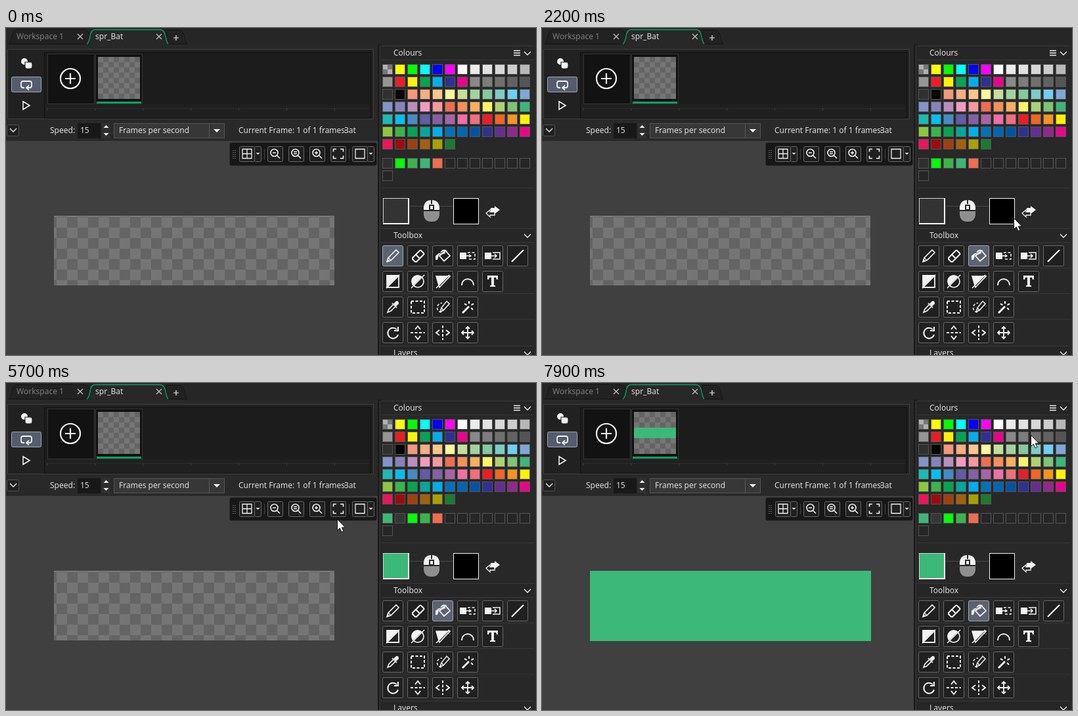
Recreate the animation shown at these times as an HTML page with a canvas. Size 807 by 498 pixels, loop 8000 ms.

```html
<!DOCTYPE html>
<html lang="en">
<head>
<meta charset="utf-8">
<title>Sprite editor</title>
<style>
html, body { margin: 0; width: 100%; height: 100%; overflow: hidden; background: #282828; }
canvas { display: block; }
</style>
</head>
<body>
<canvas id="stage" width="807" height="498"></canvas>
<script>
const ctx = document.getElementById('stage').getContext('2d');
const LOOP = 8000, STEP = 100;
const WHITE = '#f2f2f2', GREEN = '#3cb878', ACCENT = '#08a262', PANEL = '#282828';

// Moments of the clicks
const PICK_TOOL = 1600, PICK_COLOUR = 5100, FILL = 6400;

// Pointer path: time, x, y
const PATH = [
  [100, 476, 488], [500, 556, 432], [900, 632, 381], [1100, 650, 362], [1400, 669, 342],
  [1600, 671, 344], [1800, 747, 348], [2000, 748, 349], [2400, 690, 230], [2700, 662, 151],
  [3000, 733, 132], [3300, 690, 121], [3600, 664, 114], [3800, 654, 120], [4100, 700, 134],
  [4500, 766, 128], [4800, 773, 121], [5000, 793, 119], [5200, 793, 119], [5400, 766, 127],
  [5500, 690, 152], [5700, 505, 208], [6000, 352, 306], [6200, 323, 336], [6500, 323, 336],
  [6800, 430, 290], [7200, 606, 214], [7500, 692, 130], [7700, 740, 88], [7900, 745, 80]
];

const PALETTE = [
  'check ff0 0f0 0ff 00f f0f fff ebebeb e1e1e1 d7d7d7 cccccc b7b7b7',
  '959595 ed1c24 fff200 00a651 00aeef 2e3192 ec008c 898989 7d7d7d 707070 626262 555555',
  '303030 000 f7977a f9ad81 fdc68a fff79a c4df9b a2d39c 82ca9d 7bcdc8 6ecff6 7ea7d8',
  '8493ca 8882be bc8dbf f49ac2 f6989d f26c4f f68e55 fbaf5c fff467 acd372 7cc576 3bb878',
  '1abbb4 00bff3 438cca 605ca8 855fa8 a763a8 f06ea9 f26d7d ed1c24 f26522 f7941d fff200',
  '8dc73f 39b54a 00a651 00a99d 00aeef 0072bc 0066b3 0054a6 2e3192 662d91 92278f ec008c',
  'ed145b 9e0b0f a0410d a36209 aba000 1a7b30'
].map(row => row.split(' '));

// Tool icons around their centre: [outline, filled part, line width, dashed outline]
const TOOLS = [
  [
    ['M-9 9L-7 3L5 -9L9 -5L-3 7ZM-7 3L-3 7', 'M-9 9L-8 5L-5 8Z'],
    ['M-8 3L3 -8Q4 -9 5 -8L9 -4Q10 -3 9 -2L-2 9H-4L-8 5ZM-3 -2L3 4', '', 2],
    ['M-5 0L4 -8L11 0L2 8ZM-3 -5Q1 -11 6 -7M-3 -2L4 -5M-3 -3Q-8 -4 -9 3', 'M-11 0L-7 -3L-6 -1L-8 6H-11Z', 1.8],
    ['M-2 0H5M2 -2L5 0L2 2', 'M-12 -5H-2V5H-12Z', 1.5, 'M0 -5H11V5H0'],
    ['M-2 0H6M3 -3L6 0L3 3M0 -5H11V5H0', 'M-12 -5H-2V5H-12Z'],
    ['M-9 9L9 -9', '', 2.2]
  ], [
    ['M-9 -9H9V9H-9ZM-10 10L10 -10', 'M-9 8V-9H8Z', 1.8],
    ['M9 0A9 9 0 1 1 -9 0A9 9 0 1 1 9 0M-10 10L10 -10', 'M-7 6A9 9 0 0 1 6 -7Z'],
    ['M-10 -8H11L-5 9ZM-10 10L10 -10', 'M-10 -8H7L-6 6Z'],
    ['M-9 6C-9 -7 9 -7 9 6', '', 1.8],
    ['', 'M-8 -9H8V-3H6L5 -6H2V6H4V8H-4V6H-2V-6H-5L-6 -3H-8Z']
  ], [
    ['M-8 8L-6 3L1 -4L4 -1L-3 6ZM-1 -6L6 1', 'M1 -5L5 -9Q9 -10 9 -5L5 -1Z'],
    ['', '', 2, 'M-10 -9H10V9H-10Z'],
    ['M-4 7L-2 1L6 -9L10 -5L1 5ZM-2 1L1 5', '', 1.5, 'M-2 8A7 7 0 1 1 -1 -6'],
    ['M-8 9L2 -1', '', 3, 'M-5 -5L-1 -3M2 -9V-5M9 -5L5 -3M8 4L5 1']
  ], [
    ['M6 -5A8 8 0 1 0 8 3M8 -9V-3H2', '', 2],
    ['M-4 -5L0 -10L4 -5M-4 5L0 10L4 5', '', 2, 'M-11 0H11'],
    ['M-5 -4L-10 0L-5 4M5 -4L10 0L5 4', '', 2, 'M0 -11V11'],
    ['M0 -9V9M-9 0H9M-3 -6L0 -9L3 -6M-3 6L0 9L3 6M-6 -3L-9 0L-6 3M6 -3L9 0L6 3', '', 1.8]
  ]
];

function box(x, y, w, h, fill, stroke) {
  if (fill) { ctx.fillStyle = fill; ctx.fillRect(x, y, w, h); }
  if (stroke) {
    ctx.strokeStyle = stroke;
    ctx.lineWidth = 1;
    ctx.strokeRect(x + .5, y + .5, w - 1, h - 1);
  }
}

function round(x, y, w, h, r, fill, stroke) {
  ctx.beginPath();
  ctx.roundRect(x + .5, y + .5, w - 1, h - 1, r);
  ctx.fillStyle = fill;
  ctx.fill();
  if (stroke) { ctx.strokeStyle = stroke; ctx.lineWidth = 1; ctx.stroke(); }
}

function shape(x, y, d, { stroke, fill, width = 1.5, dash = [] }) {
  const path = new Path2D(d);
  ctx.save();
  ctx.translate(x, y);
  if (fill) { ctx.fillStyle = fill; ctx.fill(path); }
  if (stroke) {
    ctx.strokeStyle = stroke;
    ctx.lineWidth = width;
    ctx.setLineDash(dash);
    ctx.stroke(path);
  }
  ctx.restore();
}

const line = (x, y, d, width) => shape(x, y, d, { stroke: WHITE, width });
const solid = (x, y, d, fill = WHITE) => shape(x, y, d, { fill });

function text(s, x, y, fill = '#dedede') {
  ctx.font = '12px "Noto Sans", "Open Sans", sans-serif';
  ctx.fillStyle = fill;
  ctx.fillText(s, x, y);
}

function checker(x, y, w, h, size, ox, oy) {
  ctx.save();
  ctx.beginPath();
  ctx.rect(x, y, w, h);
  ctx.clip();
  box(x, y, w, h, '#757575');
  for (let j = -1; j * size < h; j++)
    for (let i = -1; i * size < w; i++)
      if ((i + j) & 1) box(x + ox + i * size, y + oy + j * size, size, size, '#646464');
  ctx.restore();
}

function button(x, y, w, h, mouse, selected) {
  const hover = mouse && mouse.x >= x && mouse.x < x + w && mouse.y >= y && mouse.y < y + h;
  round(x, y, w, h, 2, selected ? '#5c6272' : hover ? '#3c414c' : '#202020',
    selected ? '#a4a9b5' : hover ? '#858a96' : '#686868');
}

const close = (x, y) => shape(x, y, 'M-4 -4L4 4M4 -4L-4 4', { stroke: '#c4c4c4', width: 1.2 });
const chevron = (x, y) => line(x, y, 'M-5 -2L0 3L5 -2', 1.3);

function tabs() {
  box(0, 0, 807, 25, '#262626');
  shape(0, 0, 'M4 24.5Q7 23 9 13Q11 2.5 17 2.5H120Q126 3 128 12V24.5Z', { fill: '#222', stroke: '#151515', width: 1 });
  shape(0, 0, 'M244 3.5H264Q270 4 272 14Q273 22 276 24.5H244Z', { fill: '#222', stroke: '#151515', width: 1 });
  const edge = 'M123 24.5Q126 23 128 13Q129 2.5 136 2.5H235Q241 3 243 13Q245 23 247 24.5';
  shape(0, 0, edge, { fill: PANEL, stroke: ACCENT, width: 1.3 });
  text('Workspace 1', 16, 17, '#7d7d7d');
  text('spr_Bat', 136, 17);
  close(113, 13);
  close(233, 13);
  line(259, 15, 'M-4 0H4M0 -4V4', 1.2);
}

function timeline(filled) {
  box(2, 32, 558, 107, '#212121', '#404040');
  solid(31, 54, 'M-8 -3A5 5 0 1 1 2 -3A5 5 0 1 1 -8 -3');
  shape(31, 54, 'M-2 -2H6Q9 -2 9 1V5Q9 8 6 8H1Q-2 8 -2 5Z', { fill: WHITE, stroke: '#212121', width: 1.2 });
  round(8, 74, 46, 24, 2, '#555c6d', '#a0a6b3');
  line(31, 86, 'M-3 5H-5Q-8 5 -8 2V-2Q-8 -5 -5 -5H5Q8 -5 8 -2V2Q8 5 5 5H0M4 1.5L0 5L4 8.5', 1.8);
  line(31, 118, 'M-5 -6L5 0L-5 6Z', 1.6);

  box(58, 37, 498, 101, '#1c1c1c', '#111');
  box(60, 116, 494, 21, '#202020');
  box(62, 122, 492, 1, '#2d2d2d');
  for (let x = 62; x < 550; x += 73) box(x, 122, 1, 4, '#3d3d3d');
  box(63, 39, 72, 77, '#121212', '#363636');
  line(98, 77, 'M15 0A15 15 0 1 1 -15 0A15 15 0 1 1 15 0M-8 0H8M0 -8V8', 2.2);
  box(136, 39, 72, 77, '#111', '#363636');
  checker(140, 44, 64, 64, 8, 0, 0);
  if (filled) box(140, 68, 64, 16, GREEN);
  box(138, 112, 68, 3, ACCENT);
}

function playback() {
  box(0, 140, 566, 32, '#292929');
  round(1, 147, 19, 18, 2, '#202020', '#555');
  chevron(11, 155);
  text('Speed:', 67, 160);
  box(109, 145, 35, 23, '#181818');
  text('15', 113, 160);
  box(146, 145, 13, 11, '#303030');
  box(146, 157, 13, 11, '#303030');
  solid(152.5, 150, 'M-4 2L0 -2L4 2Z');
  solid(152.5, 162, 'M-4 -2L0 2L4 -2Z');
  box(164, 145, 169, 23, '#373737', '#555');
  box(309, 146, 1, 21, '#555');
  text('Frames per second', 172, 160);
  solid(321, 156, 'M-5 -2L0 3L5 -2Z');
  text('Current Frame: 1 of 1 frames', 354, 160);
  ctx.save();
  ctx.beginPath();
  ctx.rect(516, 146, 40, 24);
  ctx.clip();
  text('Bat', 514, 160);
  ctx.restore();
}

function canvasArea(filled, mouse) {
  box(0, 172, 566, 326, '#404040');
  checker(73, 286, 427, 106, 16, 4, 2);
  box(73, 286, 427, 1, '#858585');
  if (filled) box(73, 286, 428, 107, GREEN);

  round(340, 174, 225, 36, 3, '#171717');
  for (let y = 186; y < 200; y += 3) { box(345, y, 2, 1, '#666'); box(348, y, 2, 1, '#666'); }
  for (const x of [355, 398, 430, 462, 494, 527]) button(x, 180, 24, 24, mouse);
  for (const x of [378, 550]) {
    button(x, 180, 11, 24, mouse);
    solid(x + 5.5, 191, 'M-3 -1H3L0 2Z');
  }
  box(393, 184, 1, 16, '#444');
  box(522, 184, 1, 16, '#444');
  line(367, 191.5, 'M-7 -7H7V7H-7ZM0 -7V7M-7 0H7', 1.3);
  ['M-4 -1.5H1', 'M-4 -3H1M-4 0H1', 'M-4 -1.5H1M-1.5 -4V1'].forEach((mark, i) =>
    line(410 + 32 * i, 191.5, 'M4 -1.5A5.5 5.5 0 1 1 -7 -1.5A5.5 5.5 0 1 1 4 -1.5M2.5 2.5L7 7' + mark, 1.6));
  line(506, 191.5, 'M-7.5 -3V-7H-3M3 -7H7.5V-3M7.5 3V7H3M-3 7H-7.5V3', 1.6);
  line(539, 191.5, 'M-7 -7H7V7H-7Z', 1.3);
}

function swatch(col, y, colour) {
  const x = 573 + 19 * col;
  if (colour === 'check') {
    box(x, y, 16, 16, '#777', '#555');
    box(x + 1, y + 1, 7, 7, '#b0b0b0');
    box(x + 8, y + 8, 7, 7, '#b0b0b0');
  } else box(x, y, 16, 16, colour ? '#' + colour : '#262626', '#555');
}

function header(label, y) {
  box(571, y, 233, 22, '#262626');
  box(571, y, 233, 1, '#383838');
  box(571, y + 21, 233, 1, '#383838');
  text(label, 590, y + 15);
  chevron(794, y + 11);
}

function colourPanel(picked) {
  header('Colours', 27);
  line(778, 38, 'M-5 -3.5H5M-5 0H5M-5 3.5H5', 1.5);
  PALETTE.forEach((row, j) => row.forEach((c, i) => swatch(i, 55 + 19 * j, c)));
  const recent = picked ? ['3bb878', '363636', '0f0', '39b54a', 'f26c4f']
    : ['2f2f2f', '0f0', '39b54a', '3bb878', 'f26c4f'];
  for (let i = 0; i < 13; i++) swatch(i % 12, i < 12 ? 198 : 217, recent[i]);

  box(571, 243, 233, 1, '#383838');
  box(614, 271, 67, 1, '#484848');
  box(574, 259, 40, 40, picked ? GREEN : '#333', '#d5d5d5');
  box(612, 259, 2, 40, WHITE);
  box(574, 297, 40, 2, WHITE);
  box(681, 259, 39, 40, '#000', WHITE);
  solid(648, 279, 'M-12 0H12V6Q11 16 0 16Q-11 16 -12 6Z', '#8f8f8f');
  solid(648, 279, 'M-12 -2Q-13 -16 -1 -17V-11H1V-17Q13 -16 12 -2H4V-10H-4V-2Z');
  solid(648, 279, 'M-2 -8H2V-3H-2Z');
  solid(741, 279, 'M3 -8L11 -2L3 4V1H-3V-5H3Z');
  shape(741, 279, 'M-4 -2L-10 3L-4 9V6H3V1H-4Z', { fill: PANEL, stroke: WHITE, width: 1.3 });
}

function toolPanel(active, mouse) {
  header('Toolbox', 305);
  TOOLS.forEach((row, j) => {
    const y = 331 + 39 * j;
    if (j) box(571, y - 5, 233, 1, '#363636');
    row.forEach(([d, fill, width = 1.6, dashed], i) => {
      const x = 573 + 38 * i;
      button(x, y, 32, 32, mouse, j === 0 && i === active);
      if (fill) solid(x + 16, y + 16, fill);
      if (d) line(x + 16, y + 16, d, width);
      if (dashed) shape(x + 16, y + 16, dashed, { stroke: WHITE, width: Math.min(width, 2), dash: [4, 2.5] });
    });
  });
  header('Layers', 484);
}

function pointerAt(t) {
  if (t < PATH[0][0]) return null;
  const n = PATH.findIndex(p => p[0] > t);
  if (n < 0) return { x: 745, y: 80 };
  const [t0, x0, y0] = PATH[n - 1], [t1, x1, y1] = PATH[n];
  const k = (t - t0) / (t1 - t0);
  return { x: Math.round(x0 + (x1 - x0) * k), y: Math.round(y0 + (y1 - y0) * k) };
}

function pointer({ x, y }, bucket) {
  if (x >= 566 || y < 210) {
    shape(x, y, 'M-.5 -.5V16.5L3.3 13L6 19L9 17.7L6.3 12H11.5Z', { fill: '#fff', stroke: '#111', width: 1 });
    return;
  }
  box(x - 3, y - 3, 6, 6, null, '#e02020');
  if (bucket) {
    shape(x, y, 'M6 -13L16 -22L27 -11L17 -1Z', { fill: '#fff', stroke: '#111', width: 1.2 });
    shape(x, y, 'M11 -18Q19 -25 24 -20L21 -16L12 -13M7 -2H9', { stroke: '#111', width: 1.4 });
    solid(x, y, 'M2 -5L3 -12L7 -14L6 -7L4 -3Z', '#111');
  } else {
    shape(x, y, 'M2 -2L4 -8L17 -21L21 -17L8 -4Z', { fill: '#fff', stroke: '#111', width: 1.2 });
  }
}

function draw(t) {
  const mouse = pointerAt(t);
  const bucket = t >= PICK_TOOL, filled = t >= FILL;
  box(0, 0, 807, 498, PANEL);
  tabs();
  timeline(filled);
  playback();
  canvasArea(filled, mouse);
  box(566, 25, 5, 473, '#1c1c1c');
  box(569, 27, 1, 471, '#444');
  colourPanel(t >= PICK_COLOUR);
  toolPanel(bucket ? 2 : 0, mouse);
  if (mouse) pointer(mouse, bucket);
}

const start = performance.now();
let shown = -1;
function tick() {
  const t = Math.floor((performance.now() - start) % LOOP / STEP) * STEP;
  if (t !== shown) draw(shown = t);
  requestAnimationFrame(tick);
}
tick();
</script>
</body>
</html>
```
